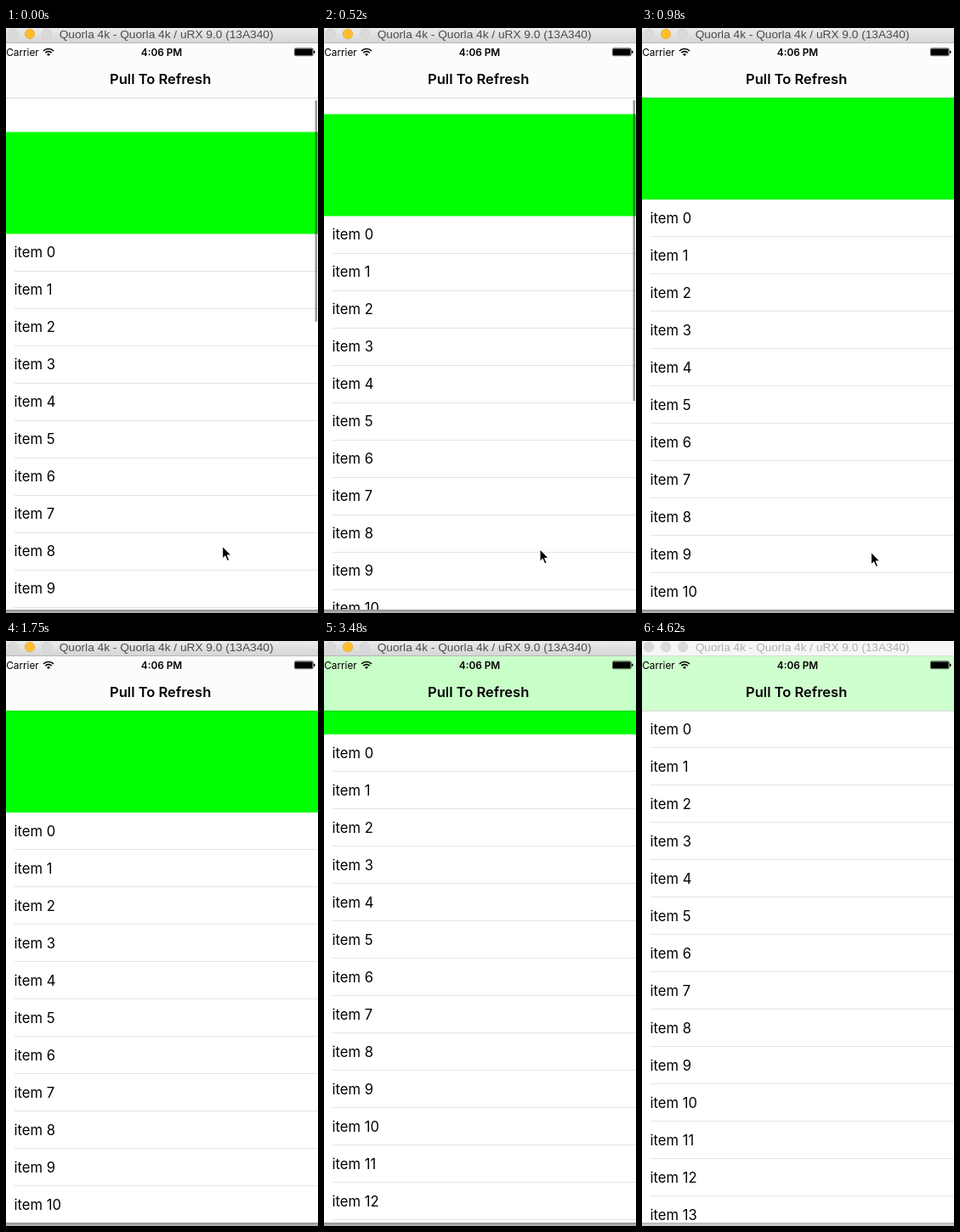
Recreate the animation shown at these times as an HTML page. Size 367 by 689 pixels, loop 4.97 s.

```html
<!DOCTYPE html>
<html lang="en">
<head>
<meta charset="utf-8">
<title>Pull To Refresh</title>
<style>
  html, body { margin: 0; width: 100%; height: 100%; overflow: hidden; background: #fff; }
  svg { display: block; }
  text { font-family: Inter, Roboto, sans-serif; fill: #000; }
  .item { font-size: 16.6px; }
  .status { font-size: 11.8px; }
  .bold { font-weight: 600; text-anchor: middle; }
  .heading { font-size: 16.5px; }
  #caption { font: 13.7px "Liberation Sans", Arial, sans-serif; }
</style>
</head>
<body>
<svg width="367" height="689" viewBox="0 0 367 689">
  <defs>
    <linearGradient id="tint" gradientUnits="userSpaceOnUse" x1="0" y1="18" x2="0" y2="82"></linearGradient>
    <linearGradient id="chrome" x1="0" y1="0" x2="0" y2="1">
      <stop offset="0" stop-color="#ebebeb"/><stop offset="1" stop-color="#d6d6d6"/>
    </linearGradient>
    <linearGradient id="shade" x1="0" y1="0" x2="0" y2="1">
      <stop offset="0" stop-color="#8f8f8f"/><stop offset="1" stop-color="#b8b8b8"/>
    </linearGradient>
    <linearGradient id="paleShade" x1="0" y1="0" x2="0" y2="1">
      <stop offset="0" stop-color="#b4b4b4"/><stop offset="1" stop-color="#d4d4d4"/>
    </linearGradient>
    <clipPath id="screen"><rect y="18" width="367" height="667"/></clipPath>
  </defs>

  <rect width="367" height="689" fill="#fff"/>
  <g clip-path="url(#screen)">
    <g id="list"><rect width="367" height="120" fill="#0f0"/></g>
    <rect id="bar" x="363.5" y="85" width="2.5" rx="1.25" fill="#000"/>
    <rect y="18" width="367" height="64" fill="url(#tint)"/>
    <rect y="82" width="367" height=".5" fill="#000" opacity=".3"/>
  </g>

  <text class="status" x=".2" y="32.5">Carrier</text>
  <g id="wifi" fill="none" stroke="#000" stroke-width="1.7"></g>
  <text class="status bold" x="183" y="32.5">4:06 PM</text>
  <rect x="339.4" y="23.9" width="21.8" height="8.8" rx="1.5" fill="none" stroke="#000" stroke-width=".7"/>
  <rect x="340" y="24.5" width="20.5" height="7.5" rx=".8"/>
  <path d="M362 26.6q1.6.3 1.6 1.7t-1.6 1.7z"/>
  <text class="heading bold" x="181.7" y="66">Pull To Refresh</text>

  <rect id="titlebar" width="367" height="17"/>
  <rect id="edge" y="17" width="367" height="1"/>
  <g id="lights"></g>
  <text id="caption" x="62.7" y="12">Quorla 4k - Quorla 4k / uRX 9.0 (13A340)</text>
  <rect id="bottom" y="685" width="367" height="4"/>
  <path id="cursor" d="M0 0V14.3L3.2 11.3L5.7 17L8 16L5.6 10.4H10Z" stroke="#fff" stroke-width="1"/>
</svg>
<script>
  const LOOP = 4970, NAV_TOP = 18, NAV_END = 82, HEAD = 120, STOPS = 16;
  const PULL = [0, 30, 100, 170];
  const BOUNCE = [430, 490, 550, 610, 670, 720, 800, 890];
  const CLOSE = [3340, 3360, 3420, 3480, 3540, 3610, 3680, 3760];

  const $ = id => document.getElementById(id);
  const set = (el, attrs) => {
    for (const k in attrs) el.setAttribute(k, attrs[k]);
    return el;
  };
  const add = (parent, tag, attrs) =>
    parent.appendChild(set(document.createElementNS("http://www.w3.org/2000/svg", tag), attrs));
  const clamp = v => Math.min(1, Math.max(0, v));
  const mix = (a, b, p) => a + (b - a) * p;
  const half = v => Math.round(v * 2) / 2;
  const hold = (t, times) => times.filter(s => s <= t).pop();

  // Remaining share of a critically damped bounce
  const spring = ms => {
    const x = ms * 0.015;
    return (1 + x) * Math.exp(-x);
  };

  for (let i = 0; i < 15; i++) {
    const y = HEAD + i * 44;
    add($("list"), "text", { class: "item", x: 9.5, y: y + 27.5 }).textContent = "item " + i;
    add($("list"), "rect", { x: 10, y: y + 43.5, width: 357, height: .5, fill: "#c8c7cc" });
  }
  const arc = r => {
    const d = r * Math.SQRT1_2;
    return `M${50 - d} ${33 - d}A${r} ${r} 0 0 1 ${50 + d} ${33 - d}`;
  };
  for (const r of [8.5, 5.3]) add($("wifi"), "path", { d: arc(r) });
  add($("wifi"), "path", { d: arc(2.8) + "L50 33Z", fill: "#000", stroke: "none" });
  const lights = [8, 28, 48].map(cx => add($("lights"), "circle", { cx, cy: 7, r: 5.75 }));
  const stops = Array.from({ length: STOPS + 1 }, (_, i) => add($("tint"), "stop", { offset: i / STOPS }));

  function headTop(t) {
    if (t < 370) return 122.5 + PULL.indexOf(hold(t, PULL)) * 0.5;
    if (t < 430) return 82;
    if (t < 890) return half(82 + 42 * spring(hold(t, BOUNCE) - 370));
    if (t < 3340) return 82;
    if (t < 3760) return half(-38 + HEAD * spring(hold(t, CLOSE) - 3294.5));
    return -38;
  }

  function drawBar(t, top) {
    let height = 374 - (top - 82);
    if (t < 370) height = 261 - (top - 122.5);
    else if (t < 430) height = 597;
    const opacity = t < 950 ? .4 : t < 980 ? .2 : 0;
    set($("bar"), { height: Math.max(0, height), opacity });
  }

  // The bar shows a blurred copy of the green header beneath it
  function drawTint(top, active) {
    const full = active ? 199 : 207;
    const under = clamp((NAV_END - top) / 6);
    stops.forEach((stop, i) => {
      const y = mix(NAV_TOP, NAV_END, i / STOPS);
      const blur = top <= -38 ? 1 : 1 / (1 + Math.exp(-1.7 * (y - top) / 20));
      const p = blur * under;
      const rb = Math.round(mix(252, full, p));
      const g = Math.round(mix(252, 255, p));
      stop.setAttribute("stop-color", `rgb(${rb},${g},${rb})`);
    });
  }

  function drawCursor(t) {
    let x, y;
    if (t < 670) {
      const p = PULL.indexOf(hold(t, PULL)) / 3;
      x = mix(254.7, 254, p);
      y = mix(610.5, 614, p);
    } else if (t < 1280) {
      const p = clamp((hold(t, BOUNCE) - 670) / 220);
      x = mix(254, 269.5, p);
      y = mix(614, 617.5, p);
    } else {
      const p = clamp((t - 1265) / 485) ** 1.4;
      x = mix(269.5, 315, p);
      y = mix(617.5, 690, p);
    }
    set($("cursor"), {
      transform: `translate(${x} ${y})`,
      visibility: t < 1750 ? "visible" : "hidden"
    });
  }

  function drawWindow(active) {
    set($("titlebar"), { fill: active ? "url(#chrome)" : "#f6f6f6" });
    set($("edge"), { fill: active ? "#b8b8b8" : "#d9d9d9" });
    set($("bottom"), { fill: active ? "url(#shade)" : "url(#paleShade)" });
    $("caption").style.fill = active ? "#4b4b4b" : "#b0b0b0";
    lights.forEach((light, i) => {
      const lit = active && i === 1;
      set(light, { fill: lit ? "#ffbd2e" : "#dadada", stroke: lit ? "#e0a226" : "#cacaca", "stroke-width": .6 });
    });
  }

  function draw(t) {
    const top = headTop(t), active = t < 4620;
    set($("list"), { transform: `translate(0 ${top})` });
    drawBar(t, top);
    drawTint(top, active);
    drawCursor(t);
    drawWindow(active);
  }

  const start = performance.now();
  function tick() {
    draw((performance.now() - start) % LOOP);
    requestAnimationFrame(tick);
  }
  tick();
</script>
</body>
</html>
```
